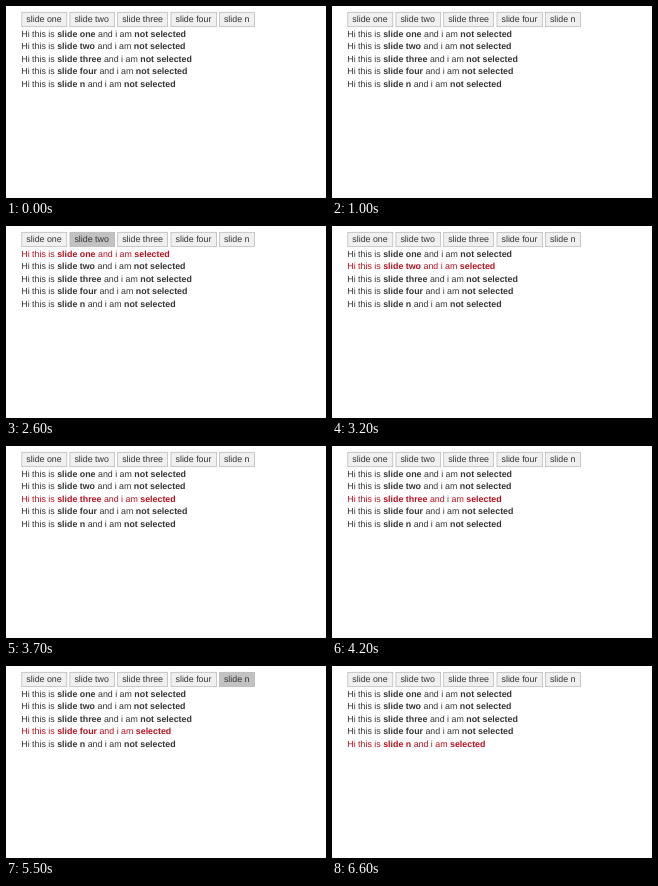
An HTML page that plays this animation: 320x192 px, repeating every 6.7 s.

```html
<!DOCTYPE html>
<html lang="en">
<head>
<meta charset="utf-8">
<title>Slide selection</title>
<style>
  html, body { margin: 0; width: 100%; height: 100%; overflow: hidden; background: #ddd; }
  svg { display: block; width: 320px; height: 192px; background: #fff; border-radius: 0 0 2px 2px; }
  text {
    font: 8.86px "Liberation Sans", Arial, sans-serif;
    fill: #333;
    text-rendering: geometricPrecision;
  }
  .bold { font-weight: bold; }
  .button { fill: #f0f0f0; stroke: #b4b4b4; stroke-width: 0.7; }
  .cover { fill: #fff; }
  .on { opacity: 0; }
  .on text { fill: #b5101d; }
  .on, .button { animation: 6700ms step-end infinite; }
</style>
</head>
<body>
<svg id="stage" viewBox="0 0 320 192"></svg>
<script>
const LOOP = 6700;
const PRESS = 100;

// x and width of the button, click time, whether the press is visible
const slides = [
  { name: 'one', x: 15.8, w: 45, click: 1600, press: false },
  { name: 'two', x: 63.9, w: 44.8, click: 2700, press: true },
  { name: 'three', x: 111.7, w: 49.8, click: 3600, press: true },
  { name: 'four', x: 165, w: 45.6, click: 4600, press: true },
  { name: 'n', x: 213.4, w: 35.2, click: 5600, press: true }
];

const percent = ms => (ms / LOOP * 100).toFixed(4) + '%';

// Holds one value between two times and another for the rest of the loop
const between = (name, prop, rest, active, start, end) => `
  @keyframes ${name} {
    0%, 100% { ${prop}: ${rest} }
    ${percent(start)} { ${prop}: ${active} }
    ${end < LOOP ? `${percent(end)} { ${prop}: ${rest} }` : ''}
  }`;

const sentence = (name, state, y) =>
  `<text x="15.3" y="${y}">Hi this is <tspan class="bold">slide ${name}</tspan>` +
  ` and i am <tspan class="bold">${state}</tspan></text>`;

let css = '';
let art = '';

slides.forEach(({ name, x, w, click, press }, i) => {
  const y = 30.5 + i * 12.5;
  const next = slides[i + 1];

  css += between('select-' + name, 'opacity', 0, 1, click, next ? next.click : LOOP);
  if (press) css += between('press-' + name, 'fill', '#f0f0f0', '#c2c2c2', click - PRESS, click);

  art += `
    <rect class="button" x="${x}" y="6.3" width="${w}" height="14.4"
      ${press ? `style="animation-name: press-${name}"` : ''}/>
    <text x="${x + 4.5}" y="16.1">slide ${name}</text>
    ${sentence(name, 'not selected', y)}
    <g class="on" style="animation-name: select-${name}">
      <rect class="cover" x="14" y="${y - 8.4}" width="180" height="11"/>
      ${sentence(name, 'selected', y)}
    </g>`;
});

document.getElementById('stage').innerHTML = `<style>${css}</style>${art}`;
</script>
</body>
</html>
```
